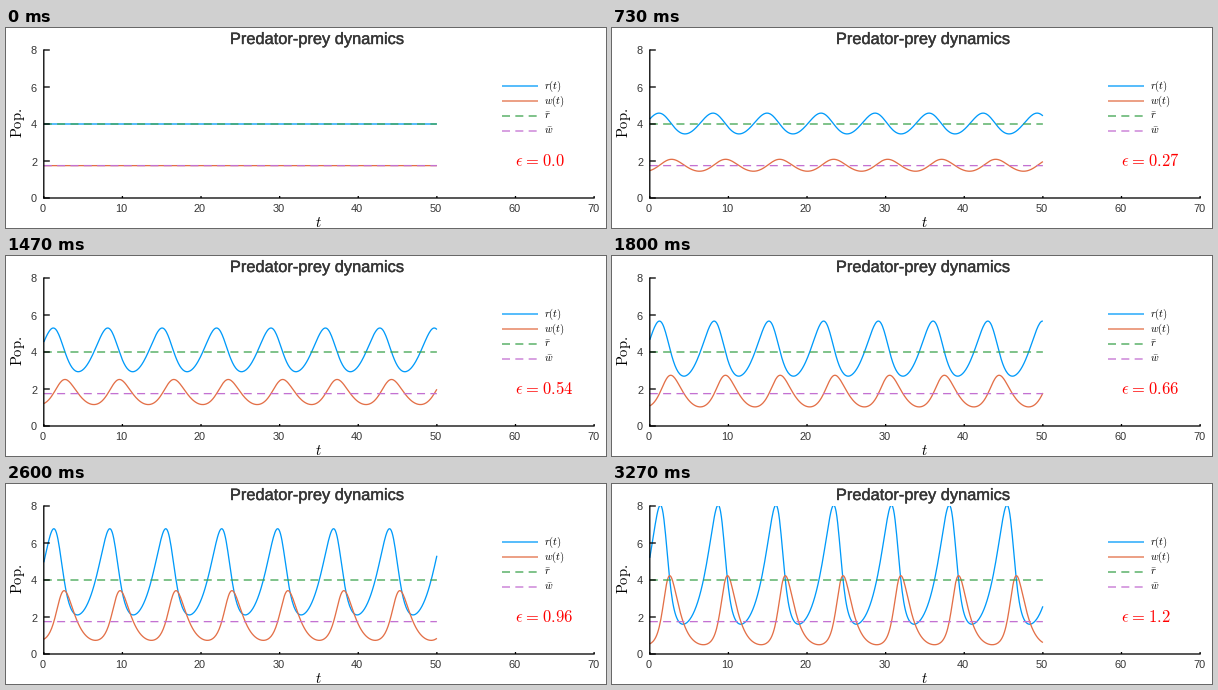
These frames come from a looping animation (600 px wide and 200 px high, 3.34 s). A matplotlib script:

```python
import numpy as np
import matplotlib.pyplot as plt
from matplotlib.animation import FuncAnimation
from matplotlib.patches import Rectangle
from matplotlib.patheffects import withStroke

plt.rcParams["mathtext.fontset"] = "cm"
plt.rcParams["font.family"] = "Liberation Sans"

WIDTH, HEIGHT, DPI = 600, 200, 100
TICK_MS, LOOP_MS = 20, 3340
STEPS, STEPS_PER_SECOND = 50, 15
LEFT, RIGHT, TOP, BOTTOM = 37.8, 588.1, 22, 170
T_MAX, POP_MAX = 70, 8
BLUE, ORANGE, GREEN, PURPLE = "#009AFA", "#E36F47", "#3EA44E", "#C371D2"
INK = "#363636"
LINE = 1.3
DASH = (0, (8 / LINE, 5.33 / LINE))

# Lotka-Volterra: r' = r(A - B w), w' = w(D r - C)
A, B, C, D = 0.7, 0.4, 1.2, 0.3
R_EQ, W_EQ = C / D, A / B


def px(t):
    return LEFT + (RIGHT - LEFT) * t / T_MAX


def py(pop):
    return BOTTOM - (BOTTOM - TOP) * pop / POP_MAX


def rates(state):
    r, w = state
    return np.array([r * (A - B * w), w * (D * r - C)])


def solve(start, times):
    """Runge-Kutta solution; result has shape (time, species, run)."""
    h = times[1] - times[0]
    states = [start]
    for _ in times[1:]:
        s = states[-1]
        k1 = rates(s)
        k2 = rates(s + h / 2 * k1)
        k3 = rates(s + h / 2 * k2)
        k4 = rates(s + h * k3)
        states.append(s + h / 6 * (k1 + 2 * k2 + 2 * k3 + k4))
    return np.array(states)


times = np.linspace(0, 50, 501)
epsilons = np.linspace(0, 1.2, STEPS)
runs = solve(np.array([R_EQ + epsilons, W_EQ - epsilons]), times)

fig = plt.figure(figsize=(WIDTH / DPI, HEIGHT / DPI), dpi=DPI, facecolor="white")
ax = fig.add_axes([0, 0, 1, 1])
ax.set_xlim(0, WIDTH)
ax.set_ylim(HEIGHT, 0)
ax.axis("off")


def line(xs, ys, color="black", style="-"):
    return ax.plot(xs, ys, color=color, lw=LINE * 72 / DPI, ls=style,
                   dash_capstyle="butt", solid_capstyle="butt", snap=False)[0]


def label(x, y, text, size, color=INK, **kwargs):
    return ax.text(x, y, text, fontsize=size * 72 / DPI, color=color,
                   va="baseline", **kwargs)


# Curves and equilibrium levels
r_curve = line([], [], BLUE)
w_curve = line([], [], ORANGE)
for curve in (r_curve, w_curve):
    curve.set_clip_path(Rectangle((LEFT - 1, TOP), RIGHT - LEFT + 1, BOTTOM - TOP,
                                  transform=ax.transData))
for level, color in ((R_EQ, GREEN), (W_EQ, PURPLE)):
    line([px(0), px(50)], [py(level)] * 2, color, DASH)

# Axes
line([LEFT, LEFT], [TOP - 0.6, BOTTOM + 0.6])
line([LEFT - 0.6, RIGHT + 0.6], [BOTTOM, BOTTOM])
for t in range(0, T_MAX + 1, 10):
    line([px(t)] * 2, [BOTTOM, BOTTOM - 2])
    label(px(t) - 1, 184, str(t), 11, ha="center")
for pop in range(0, POP_MAX + 1, 2):
    line([LEFT, LEFT + 6], [py(pop)] * 2)
    label(31, py(pop) + 4.5, str(pop), 11, ha="right")

label(311, 16, "Predator-prey dynamics", 16.4, ha="center",
      path_effects=[withStroke(linewidth=0.3, foreground=INK)])
label(312.5, 199, "$t$", 14.67, "black", ha="center")
label(16, 94.5, r"$\mathrm{Pop.}$", 14.67, "black", ha="center",
      rotation=90, rotation_mode="anchor")

# Legend
entries = (("$r(t)$", BLUE, "-"), ("$w(t)$", ORANGE, "-"),
           (r"$\bar{r}$", GREEN, DASH), (r"$\bar{w}$", PURPLE, DASH))
for row, (text, color, style) in enumerate(entries):
    y = 58 + 15 * row
    line([496, 532], [y, y], color, style)
    label(538, y + 3, text, 10.67, "black")

epsilon_text = label(509, 138, "", 16.5, "red")


def update(frame):
    # Step starts are rounded to 10 ms; a tick shows any step starting within it.
    now = frame * TICK_MS + 10
    step = min(int((now + 3.4) * STEPS_PER_SECOND / 1000), STEPS - 1)
    r_curve.set_data(px(times), py(runs[:, 0, step]))
    w_curve.set_data(px(times), py(runs[:, 1, step]))
    value = round(float(epsilons[step]), 2)
    epsilon_text.set_text(rf"$\epsilon\hspace{{0.08}}=\hspace{{0.08}}{value}$")
    return r_curve, w_curve, epsilon_text


animation = FuncAnimation(fig, update, frames=LOOP_MS // TICK_MS, interval=TICK_MS,
                          repeat=True, repeat_delay=0)
plt.show()
```
